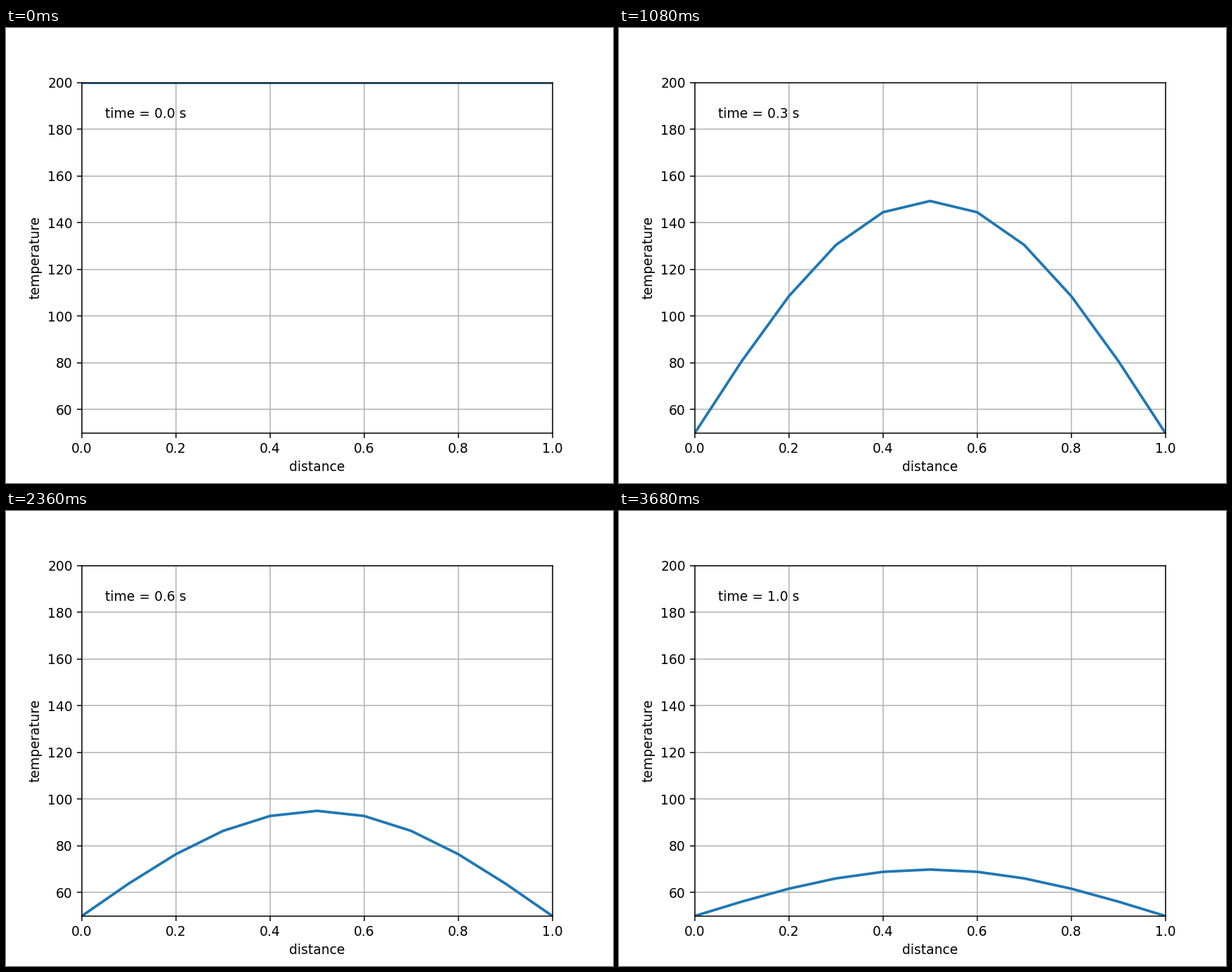
A matplotlib script that plays this animation: 864 by 648 pixels, repeating every 3720 ms.

```python
import numpy as np
import matplotlib.pyplot as plt
from matplotlib.animation import FuncAnimation

plt.rcParams["font.family"] = "DejaVu Sans"

STEPS = 92
DURATION = 1.0
HOT, COLD = 200.0, 50.0
FOURIER = 0.25  # diffusivity * dt / dx**2

x = np.linspace(0, 1, 11)


def solve():
    """Explicit heat conduction in a bar whose ends are suddenly cooled."""
    u = np.full((STEPS + 1, x.size), HOT)
    for k in range(STEPS):
        u[k + 1, 1:-1] = u[k, 1:-1] + FOURIER * np.diff(u[k], 2)
        u[k + 1, [0, -1]] = COLD
    return u


temperature = solve()

fig, ax = plt.subplots(figsize=(6.4, 4.8), dpi=135)
ax.set(xlim=(0, 1), ylim=(COLD, HOT), xlabel="distance", ylabel="temperature")
ax.grid()
line, = ax.plot([], [], lw=2)
label = ax.text(0.05, 0.9, "", transform=ax.transAxes)


def update(k):
    line.set_data(x, temperature[k])
    label.set_text(f"time = {k * DURATION / STEPS:.1f} s")
    return line, label


anim = FuncAnimation(fig, update, frames=STEPS + 1, interval=40,
                     repeat=True, repeat_delay=0)
plt.show()
```
